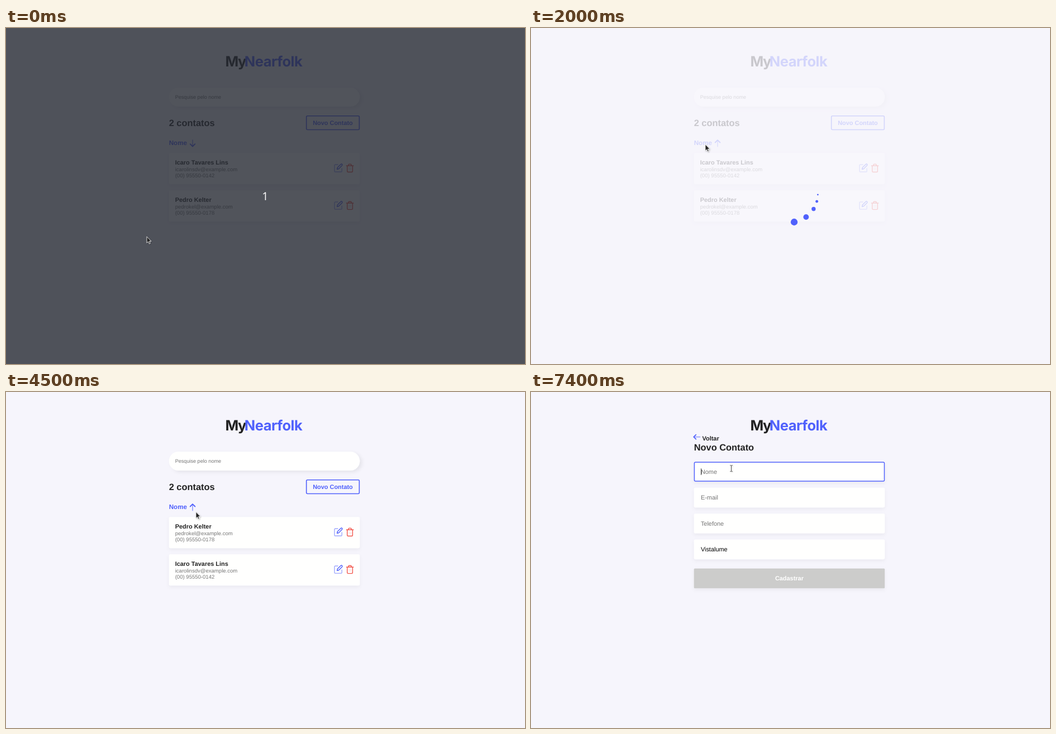
An HTML page for the animation above (8000 ms loop, 929 by 603 pixels).

```html
<!DOCTYPE html>
<html lang="pt-BR">
<head>
<meta charset="utf-8">
<title>Contatos</title>
<style>
  html, body { margin: 0; width: 100%; height: 100%; overflow: hidden; background: #f6f5fc; }
  svg { display: block; width: 929px; height: 603px; }
  text { font: 10.93px "Liberation Sans", Arial, sans-serif; fill: #222; text-rendering: geometricPrecision; white-space: pre; }
  .bold { font-weight: 700; }
  .heading { font-weight: 700; font-size: 16.4px; }
  .small { font-size: 9.56px; fill: #777; }
  .hint { fill: #757575; }
  .logo { font: 700 25.5px Inter, sans-serif; letter-spacing: -1.5px; }
  .blue { fill: #5061fc; }
  .mid { text-anchor: middle; }
  .line { fill: none; stroke: #5061fc; stroke-linecap: round; stroke-linejoin: round; }
  .faint { opacity: .55; }
  .box { fill: #fffffe; filter: url(#soft); }
</style>
</head>
<body>
<svg viewBox="0 0 929 603">
  <defs>
    <filter id="soft" filterUnits="userSpaceOnUse" x="270" y="90" width="390" height="290">
      <feDropShadow dx="0" dy="2.7" stdDeviation="3.4" flood-opacity=".05"/>
    </filter>
    <filter id="side" filterUnits="userSpaceOnUse" x="270" y="90" width="390" height="80">
      <feDropShadow dx="4" dy="2.7" stdDeviation="3.4" flood-opacity=".07"/>
    </filter>
    <filter id="lift" x="-50%" y="-50%" width="220%" height="220%">
      <feDropShadow dx=".8" dy="1" stdDeviation=".8" flood-opacity=".35"/>
    </filter>
    <g id="actions">
      <g class="line" stroke-width="1.4">
        <path class="faint" d="M594 245.2H589.4Q588 245.2 588 246.6V257Q588 258.3 589.4 258.3H599.8Q601.2 258.3 601.2 257V252"/>
        <path d="M599.4 244.4Q600.4 243.5 601.5 244.4T601.6 246.6L595.6 252.7 592.6 253.5 593.3 250.5Z"/>
      </g>
      <g class="line" style="stroke:#f2564c" stroke-width="1.4">
        <path d="M609.4 247.2H621.8M610.8 247.2V257Q610.8 258.5 612.3 258.5H619Q620.4 258.5 620.4 257V247.2M613 247V245.7Q613 244.4 614.3 244.4H617Q618.2 244.4 618.2 245.7V247"/>
        <path d="M614.2 250.5V255M617 250.5V255" stroke-width="1" opacity=".25"/>
      </g>
    </g>
  </defs>

  <rect width="929" height="603" fill="#f6f5fc"/>
  <text class="logo" x="392.6" y="68.5">My</text>
  <text class="logo blue" x="426.8" y="68.5" style="letter-spacing:-.5px">Nearfolk</text>

  <g id="list">
    <rect x="291.7" y="107" width="341.5" height="34" rx="17" fill="#fffffe" filter="url(#side)"/>
    <text class="hint" x="302.7" y="127.4" style="font-size:9.1px">Pesquise pelo nome</text>
    <text class="heading" x="291.7" y="176">2 contatos</text>
    <rect id="button" class="line" x="537.7" y="157.8" width="94.7" height="24.7" rx="2" stroke-width="1.6"/>
    <text id="buttonText" class="bold mid" x="585" y="174">Novo Contato</text>
    <text class="bold blue" x="291.7" y="210" style="font-size:11.6px">Nome</text>
    <g id="sortArrow" class="line" stroke-width="1.8">
      <path class="faint" d="M334 202V212.5"/>
      <path d="M329.7 205.5L334 201.1 338.4 205.5"/>
    </g>
    <g id="cards"></g>
  </g>

  <g id="form">
    <g class="line" stroke-width="1.7">
      <path class="faint" d="M292 80.6H302.4"/>
      <path d="M295.3 76.7L291.2 80.6 295.3 84.6"/>
    </g>
    <text class="bold" x="306.5" y="87">Voltar</text>
    <text class="heading" x="291.7" y="105">Novo Contato</text>
    <g id="fields"></g>
    <rect class="box" x="291.7" y="316.8" width="341.5" height="35.4" rx="1.5" style="fill:#cccccb"/>
    <text class="bold mid" x="462.4" y="338" style="fill:#fff">Cadastrar</text>
    <rect id="focus" class="line" x="292.4" y="125.9" width="340.1" height="34.2" rx="2" stroke-width="1.5"/>
    <path id="caret" d="M304.6 137.2V149" stroke="#222" stroke-width=".9"/>
  </g>

  <g id="loader">
    <rect width="929" height="603" fill="#f6f5fc" opacity=".79"/>
    <g id="dots" class="blue"></g>
  </g>
  <g id="countdown">
    <rect width="929" height="603" fill="#262a32" opacity=".8"/>
    <text class="mid" x="464" y="309" style="font:20px 'Open Sans',sans-serif;fill:#fff">1</text>
  </g>

  <g id="cursor" fill="#222" stroke="#fff" stroke-width=".8" stroke-linejoin="round" filter="url(#lift)">
    <path id="arrow" d="M0 0V11.3L2.6 9 4.3 12.9 6.2 12.1 4.5 8.3H8Z"/>
    <path id="hand" d="M-1.2 1Q0-.8 1.2 1V4.6Q3 4 3.4 5.2 5.6 5 6 7.5V10L4.8 13.4H-.8L-3.8 8.8Q-3.8 7-2.4 7.6L-1.2 8.6Z"/>
    <path id="beam" fill="none" stroke="#333" d="M-2.3-5.4H-1Q0-5.4 0-4.4V4.6Q0 5.6-1 5.6H-2.3M2.3-5.4H1Q0-5.4 0-4.4M0 4.6Q0 5.6 1 5.6H2.3"/>
  </g>
</svg>
<script>
const $ = id => document.getElementById(id);
const show = (id, on) => { $(id).style.display = on ? '' : 'none'; };
const mix = (a, b, p) => a + (b - a) * p;

const PEOPLE = [
  ['Icaro Tavares Lins', 'icarolinsdv@example.com', '(00) 95550-0142'],
  ['Pedro Kelter', 'pedrokel@example.com', '(00) 95550-0178'],
];
$('cards').innerHTML = PEOPLE.map(([name, mail, phone]) => `<g>
  <rect class="box" x="291.7" y="224.2" width="341.5" height="56" rx="2.4"/>
  <text class="bold" x="302.7" y="244.8">${name}</text>
  <text class="small" x="302.7" y="256.5">${mail}</text>
  <text class="small" x="302.7" y="267.5">${phone}</text>
  <use href="#actions"/></g>`).join('');

$('fields').innerHTML = ['Nome', 'E-mail', 'Telefone', 'Vistalume'].map((label, i) => `
  <rect class="box" x="291.7" y="${125.2 + i * 46.5}" width="341.5" height="35.5" rx="2.4"/>
  <text class="${i < 3 ? 'hint' : ''}" x="303.9" y="${146.8 + i * 46.5}"${i < 3 ? '' : ' style="fill:#000"'}>${label}</text>`).join('');

// Dots trail behind the leading one by these angles at each stage of a turn.
const EM = 61.45, TURN = 1700, LOADER_START = 1524;
const RADII = [.1, .08, .06, .04, .023];
const TRAIL = [
  [0, [0, 0, 0, 0, 0]], [.05, [0, 0, 0, 0, 0]],
  [.1, [0, 6, 12, 18, 21]], [.2, [0, 24, 42, 54, 65.6]],
  [.38, [0, 27, 51, 69, 83.7]], [.59, [0, 6, 12, 18, 21]],
  [.95, [0, 0, 0, 0, 0]], [1, [0, 0, 0, 0, 0]],
];
$('dots').innerHTML = RADII.map(r => `<circle r="${r * EM}"/>`).join('');

// CSS "ease": cubic-bezier(.25, .1, .25, 1)
function ease(x) {
  const curve = (s, a, b) => 3 * s * (1 - s) ** 2 * a + 3 * s * s * (1 - s) * b + s ** 3;
  let low = 0, high = 1;
  for (let i = 0; i < 24; i++) {
    const s = (low + high) / 2;
    if (curve(s, .25, .25) < x) low = s; else high = s;
  }
  return curve(low, .1, 1);
}

function between(keys, at) {
  const i = Math.max(1, keys.findIndex(k => k[0] >= at));
  const [[t0, a], [t1, b]] = [keys[i - 1], keys[i]];
  return { a, b, p: (at - t0) / (t1 - t0) };
}

function drawLoader(t) {
  const phase = ((t - LOADER_START) / TURN) % 1;
  const { a, b, p } = between(TRAIL, phase);
  [...$('dots').children].forEach((dot, i) => {
    const angle = (360 * ease(phase) - mix(a[i], b[i], ease(p))) * Math.PI / 180;
    dot.setAttribute('cx', 462.4 + .83 * EM * Math.sin(angle));
    dot.setAttribute('cy', 298 - .83 * EM * Math.cos(angle));
  });
}

const PATH = [
  [0, [252, 374.4]], [300, [252, 374.4]], [500, [262, 346]], [1000, [307, 222]], [1200, [312, 209]],
  [4400, [312, 209]], [4500, [340, 215.3]], [4700, [396, 238]], [4900, [462, 238]],
  [5100, [530, 197]], [5200, [547, 176]], [5300, [557, 165.5]], [5500, [564, 168]],
  [5700, [510, 166]], [6000, [385, 143]], [6200, [358.5, 137]], [8000, [358.5, 137]],
];

function draw(t) {
  const loading = t >= 1600 && t < 3500;
  const formOpen = t >= 5500;
  const { a, b, p } = between(PATH, t);
  const x = mix(a[0], b[0], p), y = mix(a[1], b[1], p);
  const onButton = !formOpen && x > 537 && y < 183;
  const onSort = x < 330 && y < 213 && !(t >= 1600 && t < 3600);

  show('countdown', t < 100);
  show('list', !formOpen);
  show('form', formOpen);
  show('loader', loading);
  if (loading) drawLoader(t);

  if (t < 1600) $('sortArrow').setAttribute('transform', 'matrix(1 0 0 -1 0 413.6)');
  else $('sortArrow').removeAttribute('transform');
  const swapped = t >= 3500;
  [...$('cards').children].forEach((card, i) =>
    card.setAttribute('transform', `translate(0 ${(i === 1) !== swapped ? 67.1 : 0})`));

  $('button').style.fill = onButton ? '#5061fc' : 'none';
  $('buttonText').style.fill = onButton ? '#fff' : '#5061fc';
  show('focus', t >= 6300);
  show('caret', t >= 6300 && (t < 6800 || t >= 7400));

  const kind = onButton || onSort ? 'hand' : formOpen && y < 160.5 ? 'beam' : 'arrow';
  for (const id of ['arrow', 'hand', 'beam']) show(id, id === kind);
  $('cursor').setAttribute('transform', `translate(${x} ${y})`);
}

function tick() {
  draw(Math.floor(performance.now() % 8000 / 100) * 100);
  requestAnimationFrame(tick);
}
tick();
</script>
</body>
</html>
```
